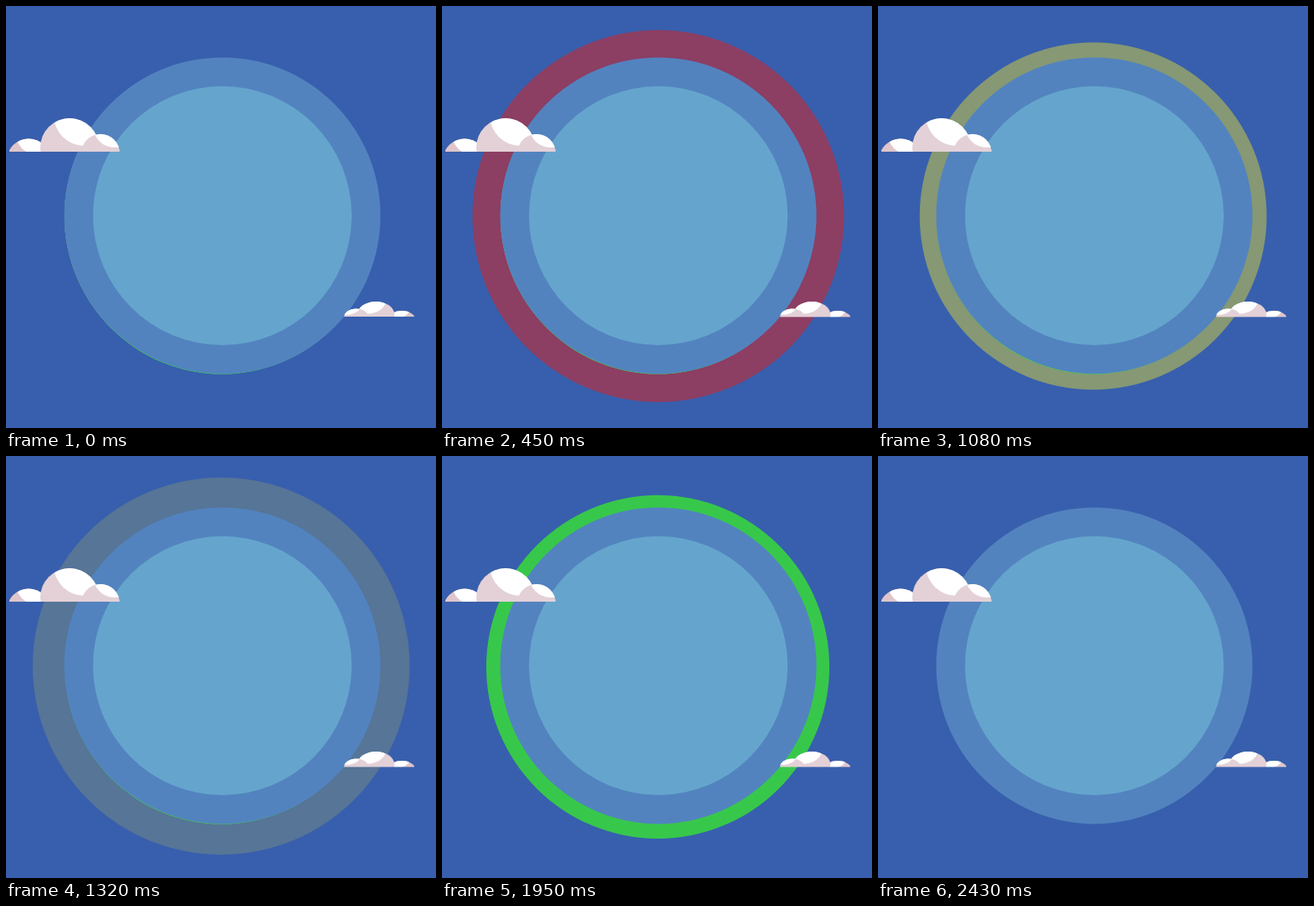
An HTML page for the animation above (2640 ms loop, 514 by 504 pixels).

```html
<!DOCTYPE html>
<html lang="en">
<head>
<meta charset="utf-8">
<title>Sky pulse</title>
<style>
  html, body { margin: 0; width: 100%; height: 100%; overflow: hidden; background: #385fad; }
  svg { display: block; width: 100%; height: 100%; }

  .pulse { animation: 2640ms linear infinite; }
  .red { fill: #ff1200; animation-name: red; }
  .yellow { fill: #fdf01e; animation-name: yellow; }
  .green { fill: #37ff18; animation-name: green; }

  @keyframes red {
    0% { r: 186.8px; opacity: 1; }
    10.227% { r: 207.6px; opacity: .71; }
    20.455% { r: 229.2px; opacity: .285; }
    25% { r: 237.3px; opacity: .1; animation-timing-function: ease-out; }
    28.03%, 100% { r: 237.6px; opacity: 0; }
  }
  @keyframes yellow {
    0%, 30.682% { r: 187.3px; opacity: .85; }
    40.909% { r: 207.3px; opacity: .4; }
    50% { r: 225.2px; opacity: .155; animation-timing-function: cubic-bezier(.1, .5, .4, 1); }
    61.364%, 100% { r: 229.2px; opacity: 0; }
  }
  @keyframes green {
    0%, 61.364% { r: 187.6px; opacity: 1; animation-timing-function: cubic-bezier(.4, .3, .7, .65); }
    73.864% { r: 205px; opacity: .66; }
    81.818% { r: 218px; opacity: .37; animation-timing-function: cubic-bezier(.3, .4, .6, .9); }
    92.045%, 100% { r: 229.3px; opacity: 0; }
  }
</style>
</head>
<body>
<svg viewBox="0 0 514 504">
  <defs>
    <clipPath id="base"><rect x="4" y="130" width="132" height="44"/></clipPath>
    <clipPath id="left"><circle cx="27" cy="184.5" r="26"/></clipPath>
    <clipPath id="mid"><circle cx="76" cy="169" r="35"/></clipPath>
    <clipPath id="right"><circle cx="113" cy="176" r="23"/></clipPath>

    <!-- each puff is shaded, with a lit circle at its upper right -->
    <g id="cloud" clip-path="url(#base)" fill="#fff">
      <g clip-path="url(#left)">
        <rect y="150" width="60" height="30" fill="#e0c6cb"/>
        <circle cx="36" cy="153" r="24"/>
        <rect x="36" y="150" width="30" height="30"/>
      </g>
      <g clip-path="url(#mid)">
        <rect x="40" y="130" width="72" height="50" fill="#e3d1d7"/>
        <circle cx="94" cy="130" r="37"/>
      </g>
      <g clip-path="url(#right)">
        <rect x="88" y="150" width="50" height="30" fill="#e3d1d7"/>
        <circle cx="130" cy="143" r="26"/>
      </g>
    </g>
  </defs>

  <rect width="514" height="504" fill="#385fad"/>
  <circle class="pulse red" cx="258.5" cy="250.9" r="187"/>
  <circle class="pulse yellow" cx="257.2" cy="250.9" r="187"/>
  <circle class="pulse green" cx="258" cy="251.9" r="187"/>

  <circle cx="258.6" cy="250.4" r="189" fill="#5283bf"/>
  <circle cx="258.6" cy="250.4" r="154.6" fill="#65a5cd"/>

  <use href="#cloud"/>
  <use href="#cloud" transform="translate(490.5 292.7) scale(-.636 .45)"/>
</svg>
</body>
</html>
```
